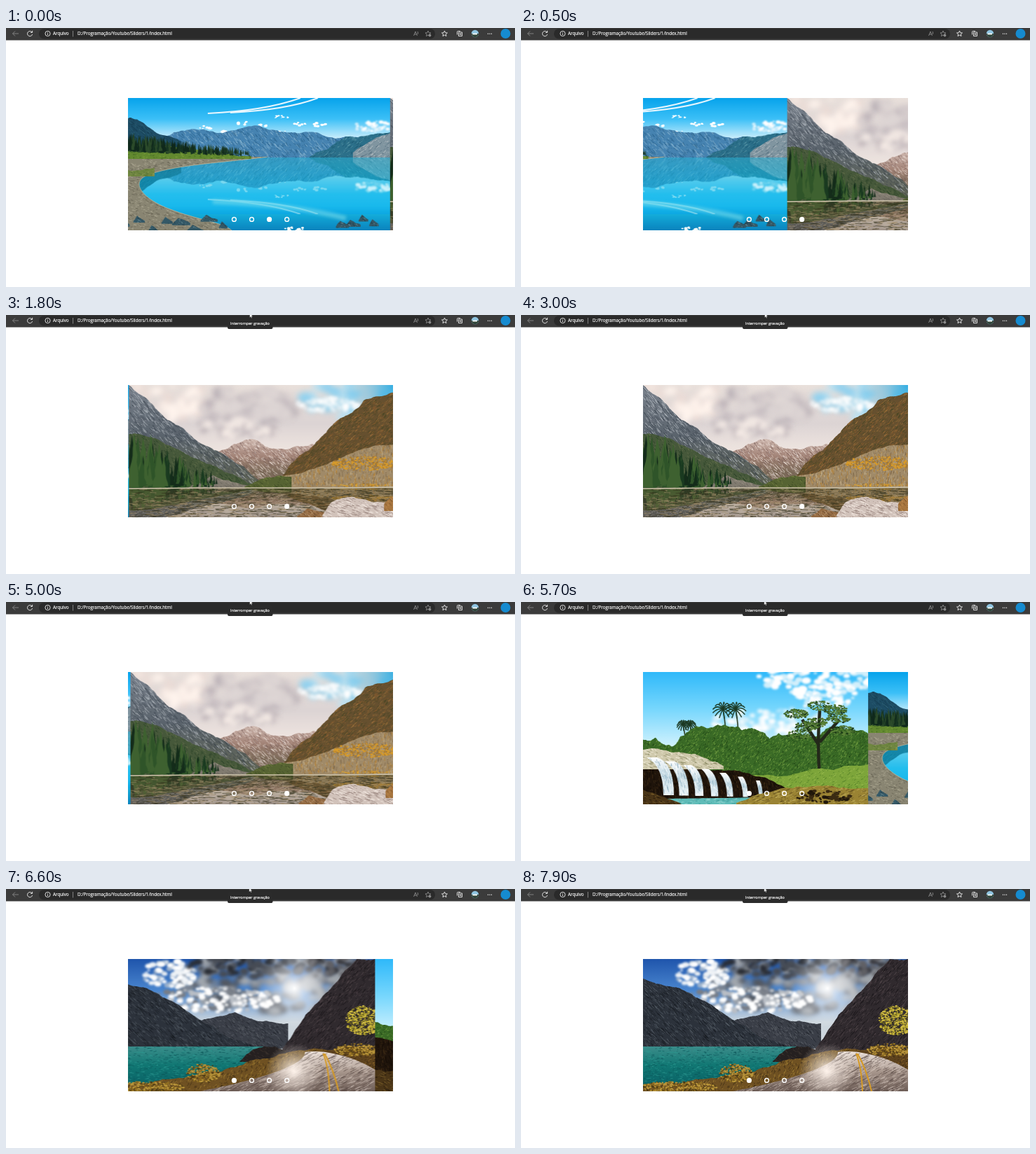
Animation of 726x370 px, one loop 8 s. Source, as an HTML page with a canvas:

```html
<!DOCTYPE html>
<html lang="pt">
<head>
<meta charset="utf-8">
<title>Slider</title>
<style>
html, body { margin: 0; width: 100%; height: 100%; overflow: hidden; background: #fff; }
#slider { position: absolute; left: 174px; top: 100px; width: 378px; height: 189px; overflow: hidden; }
#strip, #ui { position: absolute; left: 0; top: 0; }
text { font: 6.25px "Open Sans", "Noto Sans", sans-serif; fill: #fff; stroke: #fff; stroke-width: .15; }
.icon { fill: none; stroke: #eee; stroke-width: .9; }
.dim { stroke: #8a8a8a; }
.dot { stroke: #fff; stroke-width: 1.4; }
</style>
</head>
<body>
<div id="slider"><canvas id="strip" width="1512" height="189"></canvas></div>
<svg id="ui" width="726" height="370">
  <defs><path id="star" d="M0 -4L1.1 -1.3L4 -1L1.9 .8L2.5 3.6L0 2.1L-2.5 3.6L-1.9 .8L-4 -1L-1.1 -1.3Z"/></defs>
  <rect width="726" height="17.5" fill="#3b3b3b"/>
  <rect x="47" y="1" width="565" height="14.5" rx="7.2" fill="#2a2a2a"/>
  <g class="icon">
    <path class="dim" d="M18 8H9.5M13 4.5L9.5 8L13 11.5"/>
    <path d="M37 6A3.6 3.6 0 1 0 37.6 9M37.6 3.8V6.4H35"/>
    <circle cx="59.5" cy="8" r="3.6"/>
    <path d="M59.5 7.5V10M59.5 5.7V6.6"/>
    <path class="dim" d="M95.5 4V12.5M581.5 11L584 5L586.5 11M582.5 9H585.5M587 5Q588.5 7 587 9"/>
    <use class="dim" href="#star" x="602" y="8"/>
    <use href="#star" x="625.5" y="8"/>
    <path d="M643.5 9.5V5.5Q643.5 4.5 644.5 4.5H648M645.5 6H650.5V11.5H645.5ZM648 7.3V10.2M646.6 8.7H649.5"/>
    <path stroke-dasharray="0 2.5" stroke-linecap="round" style="stroke-width:1.4" d="M687.5 8.2H693"/>
  </g>
  <circle cx="604.5" cy="10.5" r="1.9" fill="#8a8a8a"/>
  <circle cx="669" cy="8" r="5.2" fill="#8fc4e0"/>
  <path d="M664 8H674Q674 13 669 13.2Q664 13 664 8Z" fill="#314438"/>
  <path d="M665.5 7.5H672V9.5H665.5Z" fill="#f1f5f5"/>
  <circle cx="712.5" cy="8" r="7" fill="#168bd0"/>
  <text x="67" y="10.4">Arquivo</text>
  <text x="102" y="10.4">D:/Programação/Youtube/Sliders/1/index.html</text>
  <g id="dots"></g>
  <g id="tooltip">
    <rect x="316" y="5" width="64.5" height="15" rx="2" fill="#2b2b2b"/>
    <text x="320" y="14.4" style="font-size:5.5px">Interromper gravação</text>
  </g>
  <path id="cursor" d="M0 0V6.2L1.5 4.9L2.5 7L3.5 6.5L2.6 4.5H4.5Z" fill="#fff" stroke="#222" stroke-width=".4"/>
</svg>
<script>
const W = 378, H = 189, LOOP = 8000;
const $ = id => document.getElementById(id);
const g = $('strip').getContext('2d');

let seed = 7;
const random = () => (seed = (seed * 16807) % 2147483647) / 2147483647;
const around = r => (random() * 2 - 1) * r;
const pick = list => list[Math.floor(random() * list.length)];

function fade(y0, y1, ...colors) {
  const f = g.createLinearGradient(0, y0, 0, y1);
  colors.forEach((c, i) => f.addColorStop(i / (colors.length - 1), c));
  return f;
}

function sky(bottom, ...colors) {
  g.fillStyle = fade(0, bottom, ...colors);
  g.fillRect(0, 0, W, H);
}

function line(color, width, d) {
  g.strokeStyle = color;
  g.lineWidth = width;
  g.stroke(new Path2D(d));
}

// Fill with the first colour, then strew short strokes of the others
function paint(path, [base, ...grains], dx, dy, top = 0, bottom = H) {
  g.save();
  g.fillStyle = base;
  g.fill(path);
  g.clip(path);
  g.globalAlpha = .65;
  for (const color of grains) {
    const strokes = new Path2D();
    for (let i = W * (bottom - top) / 22; i > 0; i--) {
      const x = random() * W, y = top + random() * (bottom - top), k = random();
      strokes.moveTo(x, y);
      strokes.lineTo(x + dx * k + around(1), y + dy * k + around(1));
    }
    g.strokeStyle = color;
    g.lineWidth = .9;
    g.stroke(strokes);
  }
  g.restore();
}

// Midpoint displacement between two key points
function crack(path, [x0, y0], [x1, y1], rough) {
  const size = Math.hypot(x1 - x0, y1 - y0);
  if (size < 3) return path.lineTo(x1, y1);
  const mid = [(x0 + x1) / 2, (y0 + y1) / 2 + around(size * rough * .08)];
  crack(path, [x0, y0], mid, rough);
  crack(path, mid, [x1, y1], rough);
}

// A ridge through a few key points, filled down to the base line
function land(keys, base, colors, dx = 4, dy = 4, rough = 1) {
  const pts = keys.split(' ').map(p => p.split(',').map(Number));
  const path = new Path2D(), first = pts[0], last = pts[pts.length - 1];
  path.moveTo(...first);
  pts.slice(1).forEach((p, i) => crack(path, pts[i], p, rough));
  path.lineTo(last[0], base);
  path.lineTo(first[0], base);
  paint(path, colors, dx, dy, Math.min(...pts.map(p => p[1])) - 5, base);
}

// Clouds (blurred) and foliage (sharp): grains within an ellipse, dark colours first
function clump(x, y, rx, ry, colors, grain, blur = 0) {
  g.filter = blur ? `blur(${blur}px)` : 'none';
  for (const color of colors) {
    const path = new Path2D();
    for (let n = 3 + 1.6 * rx * ry / grain ** 2; n > 0; n--) {
      const a = random() * 7, d = Math.sqrt(random());
      const px = x + Math.cos(a) * d * rx, py = y + Math.sin(a) * d * ry, r = grain * (.3 + .6 * random());
      path.moveTo(px + r, py);
      path.ellipse(px, py, r, r * .7, 0, 0, 7);
    }
    g.fillStyle = color;
    g.fill(path);
  }
  g.filter = 'none';
}

function glow(x, y, r, color) {
  const f = g.createRadialGradient(x, y, 0, x, y, r);
  ['', '90', '00'].forEach((alpha, i) => f.addColorStop([0, .35, 1][i], color + alpha));
  g.fillStyle = f;
  g.fillRect(x - r, y - r, 2 * r, 2 * r);
}

// Mirror what stands above the horizon into the water below
function reflect(horizon, squash, alpha) {
  const left = g.getTransform().e;
  g.save();
  g.globalAlpha = alpha;
  g.translate(0, horizon);
  g.scale(1, -squash);
  g.filter = 'blur(.7px)';
  g.drawImage(g.canvas, left, 0, W, horizon, 0, -horizon, W, horizon);
  g.restore();
}

function pine(x, base, h, color) {
  const path = new Path2D();
  path.moveTo(x, base - h);
  for (const side of [1, -1]) for (let k = 1; k <= 8; k++) {
    const u = side > 0 ? k / 8 : (9 - k) / 8;
    path.lineTo(x + side * h * .15 * u * (.6 + random() * .6), base - h * (1 - u) + around(1));
  }
  g.fillStyle = color;
  g.fill(path);
}

function palm(x, y, size) {
  line('#2a3a1c', 1.6, `M${x} ${y}q4 20 4 ${size * 3}`);
  for (let i = 0; i < 13; i++) {
    const a = i * Math.PI * 2 / 13, c = Math.cos(a) * size, s = Math.sin(a) * size * .7;
    line('#1c3a24', 1.5, `M${x} ${y}q${c * .6} ${s - 4} ${c} ${s + 3}`);
  }
}

function road() {
  sky(90, '#1f55ac', '#4a86cf', '#cdd6dd');
  clump(250, 30, 160, 46, ['#535861', '#7d838c', '#a4a9af'], 11, 3);
  clump(150, 58, 90, 18, ['#777d87', '#b9bec5', '#fff'], 6, 1.5);
  clump(85, 22, 38, 20, ['#9db2cb', '#eef2f6', '#fff'], 6, 1.5);
  clump(195, 12, 85, 15, ['#2a2e36', '#474c55'], 8, 2);
  clump(320, 10, 55, 16, ['#38393f', '#606065'], 8, 2);
  glow(263, 42, 55, '#ffffff');
  land('115,90 178,76 254,92', 128, ['#3a3e47', '#666a72', '#1e2128']);
  land('0,28 75,55 142,94 218,127', 127, ['#2c323b', '#5c636d', '#14171c'], 6, 6);
  land('246,128 290,68 318,38 352,0 378,0', 142, ['#302a2e', '#574a4e', '#151215'], -5, 6);
  land('0,125 220,125', 182, [fade(125, 178, '#3c8c8a', '#117773', '#0a6467'), '#2e9a92', '#0b5558'], 5, 0, 0);
  land('185,146 204,129 235,125 256,134', 147, ['#252020', '#4c4038']);
  land('0,181 120,166 200,145 255,133 320,130', H, ['#6f5122', '#b18c39', '#2c2012'], 2, -4);
  land('290,132 330,125 378,130', 165, ['#5d421d', '#b98832', '#2a1d0e'], 3, -2);
  const tarmac = new Path2D('M278 133Q298 130 318 135Q350 141 378 158V189H128C205 174 279 153 278 133Z');
  paint(tarmac, [fade(132, H, '#efe4dd', '#a8978d', '#6d5d56'), '#cfc2ba', '#5b4c47'], -12, 6, 130);
  glow(262, 160, 40, '#fff4ec');
  line('#d59a25', 2, 'M304 135Q312 155 313 189M306 135Q319 158 326 189');
  const gold = ['#4a3a14', '#8f6d20', '#b8943a'];
  clump(133, 163, 24, 13, gold, 2);
  clump(50, 183, 55, 8, gold, 2);
  clump(352, 130, 32, 9, gold, 2);
  clump(362, 88, 26, 21, ['#6d651f', '#a89a2c', '#d0bb42'], 2);
}

function waterfall() {
  sky(110, '#2fb9fa', '#7ad8fd', '#d8f4fe');
  const white = ['#d3effb', '#fff'];
  clump(305, 10, 85, 22, white, 8, 1.5);
  clump(318, 36, 45, 18, white, 6, 1.5);
  clump(240, 72, 85, 20, white, 7, 2);
  for (const x of [114, 124]) palm(x, 75, 9);
  for (const x of [171, 189]) palm(x, 53, 15);
  land('0,90 100,106 185,78 290,92 378,88', 165, ['#3a6a26', '#16350f', '#6d9c3b', '#28531c', '#8bb650'], 2, -3, 2.5);
  line('#23281a', 4.5, 'M309 55Q305 105 309 149M308 105L284 68M309 100L337 68');
  for (let i = 0; i < 8; i++)
    clump(309 + 34 * Math.sin(i * 2.4), 48 + i * 6, 17, 7, ['#1a3516', '#3c6426', '#5b8137'], 2);
  land('190,150 280,144 378,132', 170, ['#7da53a', '#a8c659', '#416f20'], 3, -2);
  land('0,112 110,124 232,151 262,166', H, ['#1f140b', '#4c351b', '#0c0703'], 1, 6);
  land('45,113 90,112 172,135', 139, ['#cfc9ac', '#fbf7e8', '#75754c'], 6, 2);
  for (let i = 0; i < 7; i++) {
    const x = 62 + i * 26, y = 122 + i * 5.5, w = 15 - i * 1.6, drop = 54 - i * 5, lean = 24 - i * 3.3;
    const fall = new Path2D(`M${x} ${y}h${w}q${lean} 8 ${lean} ${drop}h${-w}q0 ${12 - drop} ${-lean} ${-drop}`);
    paint(fall, [fade(y, y + drop, '#fff', '#bdd5e0', '#eef7fa'), '#fff', '#7fa3b5'], 2, 9, y, y + drop);
  }
  land('90,181 245,179', H, ['#5fbcb8', '#b7e2dd', '#2f8d8d'], 6, 0, 0);
  land('0,158 57,168 112,189', H, ['#4a3517', '#8c6e33', '#1a1007'], 5, 2);
  land('190,187 240,171 320,162 378,166', H, ['#9a8333', '#d3c06a', '#54431a'], 6, -2);
  clump(314, 178, 38, 9, ['#1f160a', '#3a2b12'], 4, .7);
}

function lake() {
  sky(60, '#06a3ec', '#3cc0f7', '#d6f1fc');
  line('#e9f7fe', 2, 'M118 22Q200 18 250 0M150 21Q230 17 275 0');
  for (let i = 0; i < 7; i++) clump(115 + i * 27, 42 + 8 * Math.sin(i * 2), 9, 3, ['#fff'], 3, .7);
  clump(353, 41, 26, 8, ['#d9f1fc', '#fff'], 4, 1);
  clump(221, 27, 15, 2, ['#fff'], 2, .7);
  land('60,54 140,50 215,46 300,58 378,55', 86, ['#4683b1', '#9cc3d9', '#22587f'], 5, 6, 1.3);
  land('262,85 315,55 378,49', 86, ['#2b6f89', '#659fae', '#174d67'], -5, 4);
  land('325,78 350,62 378,50', 85, ['#8095a0', '#dedfdf', '#486475'], -5, 4);
  land('0,30 8,28 45,50 80,62', 86, ['#1d4c64', '#356c80', '#123447']);
  g.fillStyle = fade(85, H, '#2cb0d3', '#0cb8e2', '#18c2ea', '#0a83bd');
  g.fillRect(0, 85, W, H - 85);
  reflect(85, .95, .45);
  clump(357, 126, 28, 7, ['#c9f1fc'], 4, 1);
  g.filter = 'blur(2px)';
  line('#7bdbec90', 7, 'M125 148Q240 152 315 172');
  g.filter = 'none';
  const shore = 'M203 84C145 92 60 96 28 112C8 123 28 145 62 158C105 175 138 177 152 189';
  paint(new Path2D(shore + 'H0V84Z'), ['#898572', '#bbb59f', '#595749'], 4, 1, 84);
  line('#bfb99c', .8, shore);
  land('0,72 110,75 180,83', 87, ['#62892f', '#90af45', '#365a20'], 3, 0);
  land('0,102 42,100', 112, ['#6f8640', '#a3a86b', '#4a6330'], 3, 0);
  for (let i = 0; i < 260; i++) {
    const x = random() * 178;
    pine(x, 75 + x * .035 + around(2), Math.max(3, 22 - x * .1 + around(4)), pick(['#173522', '#2b4a2a', '#10291c']));
  }
  for (let i = 0; i < 12; i++) {
    const x = i < 8 ? i * 20 : 190 + i * 15, y = i < 8 ? 178 + 8 * Math.sin(i * 4) : 178 + around(8), w = 6 + random() * 7;
    land(`${x - w},${y + 4} ${x - w / 3},${y - 4} ${x + w},${y + 3}`, y + 6, ['#345866', '#8fb0b6', '#152a34'], 3, 2);
  }
  clump(240, 187, 16, 3, ['#f3fafa'], 3);
}

function peaks() {
  sky(110, '#e9e0db', '#dcd4d4', '#f6ebe4');
  clump(325, 20, 75, 28, ['#b9e2f3', '#8bd0f0'], 12, 5);
  glow(W, 0, 75, '#35aee2');
  clump(285, 28, 48, 10, ['#eef6f9', '#fff'], 5, 2);
  clump(50, 25, 65, 30, ['#ecdcd6', '#fff4ed'], 10, 4);
  clump(170, 32, 70, 30, ['#b9b0b6', '#cfc6c8', '#ddd5d4'], 10, 4);
  clump(155, 62, 60, 14, ['#c4babd', '#f3e9e4'], 7, 3);
  land('105,106 150,84 180,78 208,91 262,84 290,100', 147, [fade(78, 125, '#cbb4ab', '#a38478', '#7b6a58'), '#fff8f3', '#705753', '#e6d4cb'], 5, 5, 1.4);
  land('0,0 55,50 100,82 185,136', 147, [fade(0, 146, '#7b838e', '#5a636c', '#5f6352'), '#c9cdd2', '#363f48'], 6, 7);
  land('0,70 70,92 150,128 195,146', 147, ['#46583a', '#6f7852', '#203820'], 3, 4);
  land('85,146 120,129 178,146', 147, ['#817b70', '#aaa08f', '#56524a']);
  land('205,142 256,94 297,51 335,22 378,11', 147, ['#66502f', '#39421f', '#96602f', '#4a4626', '#a4763f'], -4, 4, 1.4);
  land('195,142 225,129 300,106 378,85', 147, ['#a08a68', '#cbb68f', '#755f42', '#b7812f'], 0, -6);
  clump(335, 112, 46, 10, ['#a5782f', '#d69a2b'], 2);
  clump(330, 143, 40, 2, ['#a87829', '#dba334'], 1.5);
  land('165,145 205,132 232,131', 147, ['#566332', '#7f8a48', '#323f20']);
  for (let i = 0; i < 90; i++) {
    const x = random() * 125;
    pine(x, 147 - random() * 6, (90 - x * .6) * (.45 + .55 * random()), pick(['#1a3a20', '#2f5429', '#142c1a', '#3e6130']));
  }
  g.fillStyle = fade(147, H, '#4d4a2d', '#746345', '#5b4a32');
  g.fillRect(0, 147, W, H - 147);
  reflect(147, .42, .6);
  g.globalAlpha = .3;
  land('0,148 378,148', H, ['#5b4a3200', '#a18c69', '#33301c'], 12, 0, 0);
  g.globalAlpha = 1;
  line('#cfc5ad', 1.3, 'M0 148L110 147H300L378 146');
  land('240,187 255,176 300,186', H, ['#966d45', '#d5b995', '#543b25']);
  land('276,186 288,168 320,160 378,172', H, ['#d1c2ba', '#fff6f0', '#806b63'], 8, 3);
  land('364,170 378,158', 180, ['#a8763f', '#d5a869', '#6f4a26']);
}

[road, waterfall, lake, peaks].forEach((scene, i) => {
  g.save();
  g.translate(i * W, 0);
  g.beginPath();
  g.rect(0, 0, W, H);
  g.clip();
  scene();
  g.restore();
  $('dots').innerHTML += `<circle class="dot" cx="${325.4 + 25.1 * i}" cy="273.4" r="2.9"/>`;
});

// The CSS "ease" curve: cubic-bezier(.25, .1, .25, 1)
function ease(x) {
  if (x <= 0) return 0;
  if (x >= 1) return 1;
  let lo = 0, hi = 1, u;
  for (let i = 0; i < 24; i++) {
    u = (lo + hi) / 2;
    if (.75 * u * (1 - u) + u ** 3 < x) lo = u; else hi = u;
  }
  return .3 * u * (1 - u) ** 2 + 3 * u * u * (1 - u) + u ** 3;
}

function render(now) {
  const t = now % LOOP;
  const shift = 2 * W + W * ease((t + 43) / 2000) - 3 * W * ease((t - 4987) / 2000);
  $('strip').style.transform = `translateX(${-shift}px)`;
  const active = t < 50 ? 2 : t < 5050 ? 3 : 0;
  [...$('dots').children].forEach((dot, i) => dot.setAttribute('fill', i === active ? '#fff' : 'none'));
  $('tooltip').style.display = t < 1400 ? 'none' : '';
  const [x, y] = t < 900 ? [348, -20] : t < 1100 ? [347, -5.5] : t < 5400 ? [347.6, -2.5] : [346.8, -2];
  $('cursor').setAttribute('transform', `translate(${x} ${y})`);
  requestAnimationFrame(render);
}
requestAnimationFrame(render);
</script>
</body>
</html>
```
